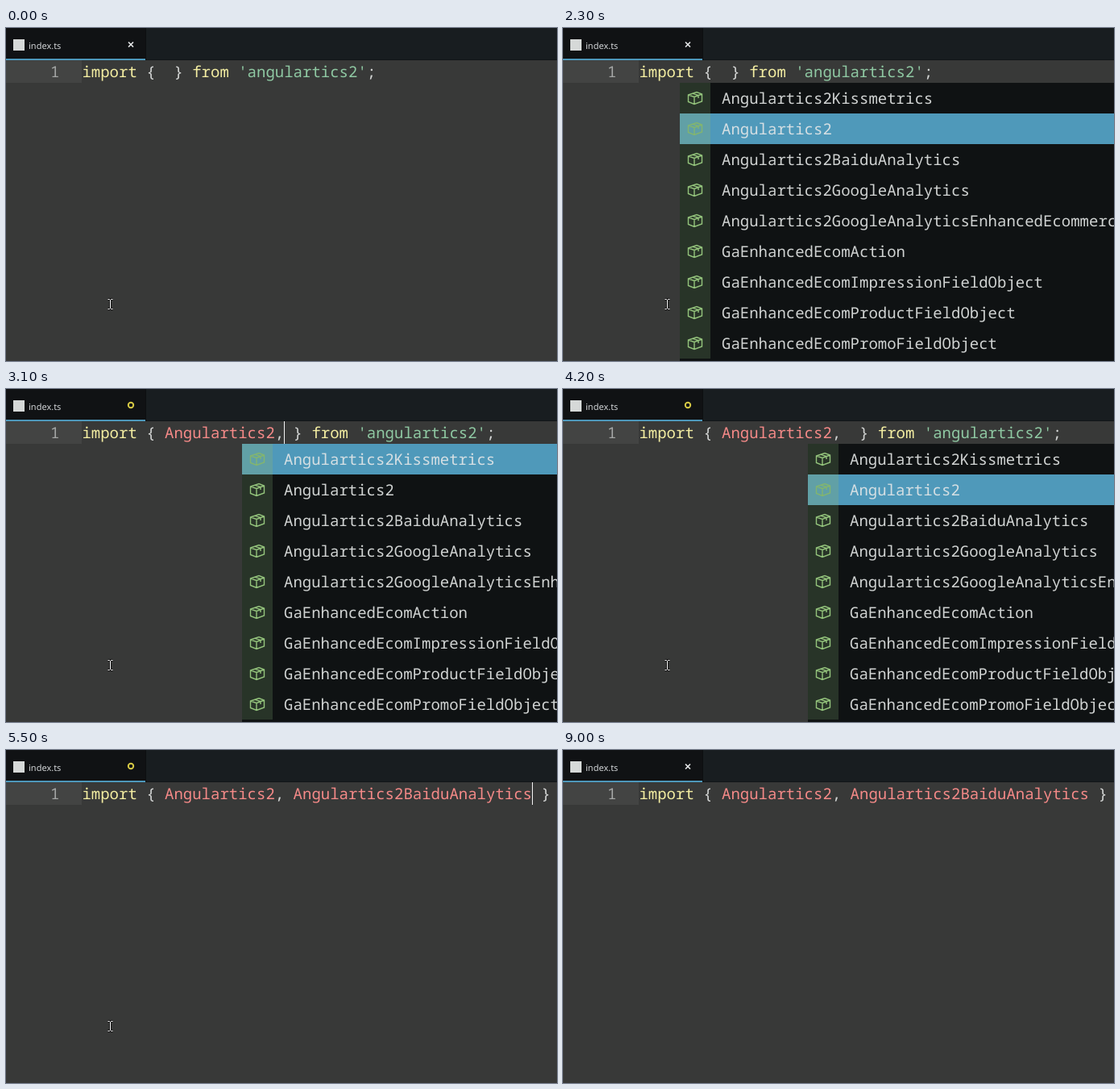
Recreate the animation shown at these times as an HTML page. Size 684 by 413 pixels, loop 9400 ms.

```html
<!DOCTYPE html>
<html>
<head>
<meta charset="utf-8">
<style>
html, body { margin: 0; width: 100%; height: 100%; overflow: hidden; background: #383938; }
svg { display: block; }
text { white-space: pre; text-rendering: geometricPrecision; }
.mono { font: 19px "Noto Sans Mono", monospace; }
.tab { font: 11px "Noto Sans", sans-serif; }
</style>
</head>
<body>
<svg id="stage" width="684" height="413" viewBox="0 0 684 413">
  <rect width="684" height="40" fill="#181d20"/>
  <rect y="39" width="684" height="1" fill="#121618"/>
  <rect width="173" height="38" fill="#101214"/>
  <rect x="173" width="1" height="40" fill="#0c0f11"/>
  <rect y="38" width="173" height="2" fill="#4d97ba"/>
  <rect x="9" y="14" width="14" height="14" fill="#d6d9d8"/>
  <text class="tab" x="28" y="25.5" fill="#d3d6d8">index.ts</text>
  <rect y="40" width="94" height="28" fill="#434443"/>
  <text class="mono" x="55" y="61" fill="#a3a5a4">1</text>
  <g id="view"></g>
</svg>
<script>
const LOOP = 9400, CHAR = 11.4, LEFT = 94.4, ROW = 38;
const A = 'Angulartics2', GA = 'GaEnhancedEcom';
const items = [A + 'Kissmetrics', A, A + 'BaiduAnalytics', A + 'GoogleAnalytics',
  A + 'GoogleAnalyticsEnhancedEcommerce', GA + 'Action', GA + 'ImpressionFieldObject',
  GA + 'ProductFieldObject', GA + 'PromoFieldObject'];
const colors = { key: '#f4eea2', name: '#f58a88', plain: '#d4d6d5', str: '#8fc9a3' };

// Each step changes part of the state; pick is the chosen menu row, -1 when closed.
const steps = [
  [0, { names: [['plain', '']], caret: 0, dirty: 0, pick: -1, mouse: 1 }],
  [300, { caret: 1 }], [500, { pick: 0 }], [700, { caret: 0 }], [1100, { caret: 1 }],
  [1500, { caret: 0 }], [1800, { pick: 1 }], [1900, { caret: 1 }], [2300, { caret: 0 }],
  [2500, { names: [['name', A]], pick: -1, caret: 1 }],
  [2800, { dirty: 1 }],
  [2900, { names: [['name', A], ['plain', ',']] }],
  [3100, { pick: 0 }], [3300, { caret: 0 }], [3700, { caret: 1 }],
  [3800, { names: [['name', A], ['plain', ', ']], pick: -1 }],
  [4000, { pick: 0 }], [4100, { pick: 1 }], [4200, { caret: 0 }], [4500, { caret: 1 }],
  [4600, { pick: 2 }], [4900, { caret: 0 }], [5300, { caret: 1 }],
  [5500, { names: [['name', A], ['plain', ', '], ['name', items[2]]], pick: -1 }],
  [5800, { caret: 0 }], [6200, { caret: 1 }], [6400, { mouse: 0 }], [6600, { caret: 0 }],
  [7000, { caret: 1 }], [7400, { caret: 0 }], [7800, { caret: 1 }], [8200, { caret: 0 }],
  [8600, { caret: 1 }], [9000, { caret: 0, dirty: 0 }]
];

const rect = (x, y, w, h, fill) =>
  `<rect x="${x}" y="${y}" width="${w}" height="${h}" fill="${fill}"/>`;
const mono = (x, y, str, fill) =>
  `<text class="mono" x="${x}" y="${y}" fill="${fill}">${str}</text>`;
const line = (d, stroke, width) =>
  `<path d="${d}" fill="none" stroke="${stroke}" stroke-width="${width}"/>`;

function codeLine(names) {
  const parts = [['key', 'import'], ['plain', ' { '], ...names, ['plain', ' } '],
    ['key', 'from'], ['plain', ' '], ['str', "'angulartics2'"], ['plain', ';']];
  let col = 0;
  return parts.map(([kind, str]) => {
    const out = mono(LEFT + col * CHAR, 61, str, colors[kind]);
    col += str.length;
    return out;
  }).join('');
}

function box(x, y, color) {
  const d = 'M-8.5 -4 L2 -7.5 L8.5 -5 V4 L-1 7.5 L-8.5 4.5 Z ' +
    'M-8.5 -4 L-1 -1.5 L8.5 -5 M-1 -1.5 V7.5 M-3.5 -5.8 L4 -3.4 V0';
  return `<g transform="translate(${x} ${y})">${line(d, color, 1.4)}</g>`;
}

function menu(x, pick) {
  const rows = items.map((name, i) => {
    const y = 68 + i * ROW, on = i === pick;
    return (on ? rect(x, y, 684, ROW, '#4f99ba') : '') +
      rect(x, y, ROW, ROW, on ? '#61a0a6' : '#283428') +
      box(x + 19, y + 19, on ? '#83b56f' : '#94c47c') +
      mono(x + 52, y + 26, name, on ? '#d5dfe3' : '#d0d3d2');
  });
  return rect(x, 68, 684, 345, '#0f1213') + rows.join('');
}

function draw(s) {
  const typed = s.names.reduce((n, part) => n + part[1].length, 0);
  const x = Math.floor(LEFT + (9 + typed) * CHAR + 0.01);
  const beam = 'M126.5 336.5 H128.5 L129.5 337.5 L130.5 336.5 H132.5 M129.5 337.5 V347.5 ' +
    'M126.5 348.5 H128.5 L129.5 347.5 L130.5 348.5 H132.5';
  return codeLine(s.names) +
    (s.caret ? rect(x, 40, 1, 28, '#f4f4f4') : '') +
    (s.pick < 0 ? '' : menu(x - 52, s.pick)) +
    (s.dirty ? '<circle cx="155" cy="20" r="3.2" fill="none" stroke="#d6c944" stroke-width="2"/>'
      : line('M152 17.5 L158 23.5 M158 17.5 L152 23.5', '#e4e6e7', 1.7)) +
    (s.mouse ? line(beam, '#161616', 3) + line(beam, '#fff', 1) : '');
}

const view = document.getElementById('view');
let shown = '';
function frame(now) {
  const t = now % LOOP;
  const state = Object.assign({}, ...steps.filter(s => s[0] <= t).map(s => s[1]));
  const next = draw(state);
  if (next !== shown) view.innerHTML = shown = next;
  requestAnimationFrame(frame);
}
frame(performance.now());
</script>
</body>
</html>
```
